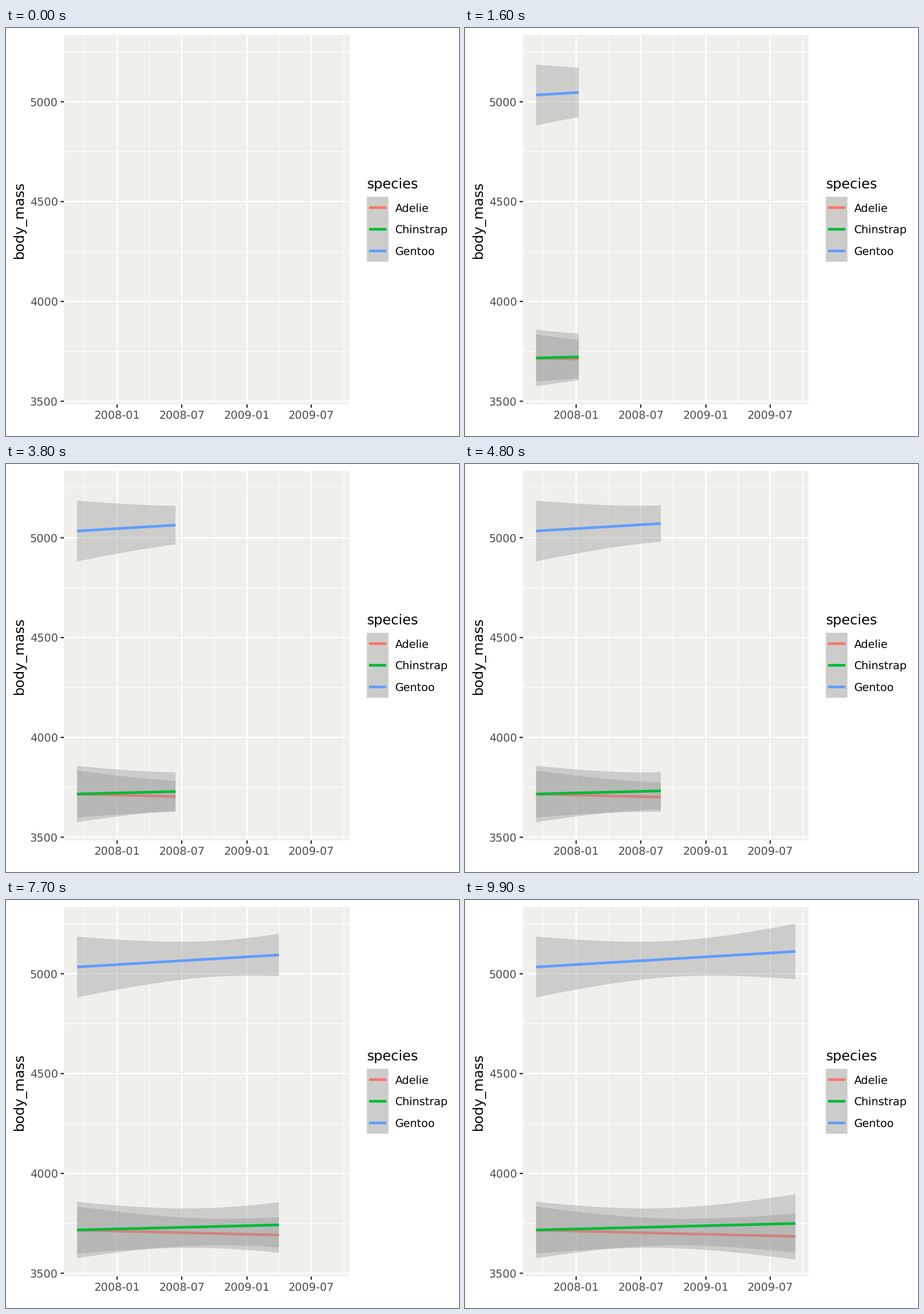
These frames come from a looping animation (789 px wide and 710 px high, 10 s). A matplotlib script:

```python
import numpy as np
import matplotlib.pyplot as plt
from matplotlib.animation import FuncAnimation
from matplotlib.patches import Polygon, Rectangle

W, H, DPI = 789, 710, 100
FRAMES, POINTS = 100, 80
PT = 2.182                      # pixels per layout point
PX = 72 / DPI                   # pixels to font points
LEFT, RIGHT, TOP, BOTTOM = 101.2, 598.2, 12, 654.9
X0, SPAN = 123.8, 451.7         # first date and width of the fits
PANEL, BAND = "#EFF0EB", "#999999"
SMALL, LARGE = 8.8 * PT, 11 * PT
THICK, THIN, BOLD = 2.33, 1.165, 4.66

# name, colour, line start and end, squared half width: a + b (u - c)^2
FITS = [
    ("Adelie", "#F8766D", 574.4, 585.5, 660, 0.0194, 229.4),
    ("Chinstrap", "#00BA38", 574.3, 562.9, 1053, 0.0284, 218.7),
    ("Gentoo", "#619CFF", 116.6, 89.6, 982, 0.0310, 242.0),
]

plt.rcParams.update({"font.family": "DejaVu Sans", "text.hinting": "none"})
fig = plt.figure(figsize=(W / DPI, H / DPI), dpi=DPI, facecolor="white")
ax = fig.add_axes([0, 0, 1, 1])
ax.set(xlim=(0, W), ylim=(H, 0))
ax.axis("off")


def rect(x, y, w, h, color, **kw):
    ax.add_patch(Rectangle((x, y), w, h, fc=color, lw=0, snap=False, **kw))


def line(xs, ys, color, width, z=1):
    return ax.plot(xs, ys, color=color, lw=width * PX, zorder=z, snap=False,
                   solid_capstyle="butt", solid_joinstyle="round")[0]


def text(x, y, s, size, color="black", ha="left", **kw):
    ax.text(x, y, s, fontsize=size * PX, color=color, ha=ha, va="baseline", **kw)


def day_x(day):
    """Pixel position of a day counted from 2008-01-01."""
    return 193.6 + 0.618 * day


def mass_y(mass):
    return 128.4 + (5000 - mass) * 0.3474


def draw_panel():
    rect(LEFT, TOP, RIGHT - LEFT, BOTTOM - TOP, PANEL, zorder=0)
    days = [-184, 0, 182, 366, 547, 731]
    for a, b in zip(days, days[1:]):
        line([day_x((a + b) / 2)] * 2, [TOP, BOTTOM], "white", THIN)
    for mass in range(3750, 5251, 500):
        line([LEFT, RIGHT], [mass_y(mass)] * 2, "white", THIN)

    labels = ["2008-01", "2008-07", "2009-01", "2009-07"]
    for day, label in zip(days[1:-1], labels):
        x = day_x(day)
        line([x, x], [TOP, BOTTOM], "white", THICK, 2)
        line([x, x], [BOTTOM, BOTTOM + 6], "#333333", THICK)
        text(x, 679.8, label, SMALL, "#4D4D4D", "center")
    for mass in range(3500, 5001, 500):
        y = mass_y(mass)
        line([LEFT, RIGHT], [y, y], "white", THICK, 2)
        line([LEFT - 6, LEFT], [y, y], "#333333", THICK)
        text(90.4, y + 7, mass, SMALL, "#4D4D4D", "right")
    text(29.6, (TOP + BOTTOM) / 2, "body_mass", LARGE, ha="center",
         rotation=90, rotation_mode="anchor")


def draw_legend():
    x, y, key = 628.4, 293.7, 37.7
    text(x, 278.6, "species", LARGE)
    rect(x, y, key, 3 * key, PANEL, zorder=0)
    rect(x, y, key, 3 * key, BAND, alpha=0.4, zorder=1)
    for i, (name, color, *_) in enumerate(FITS):
        mid = y + (i + 0.5) * key
        line([x + 0.1 * key, x + 0.9 * key], [mid, mid], color, BOLD, 2)
        text(x + key + 12, mid + 7, name, SMALL)


def curves(u, start, end, a, b, c):
    mid = start + (end - start) * u / SPAN
    half = np.sqrt(a + b * (u - c) ** 2)
    return mid, mid - half, mid + half


draw_panel()
draw_legend()

grid = np.linspace(0, SPAN, POINTS)
# each fitted point appears on a whole frame; frames between are interpolated
arrival = np.round(np.arange(POINTS) * (FRAMES - 1) / (POINTS - 1))

bands, lines = [], []
for i, fit in enumerate(FITS):
    band = Polygon([(0, 0)] * 3, fc=BAND, lw=0, alpha=0.4, zorder=3 + 2 * i)
    bands.append(ax.add_patch(band))
    lines.append(line([], [], fit[1], BOLD, 4 + 2 * i))


def update(k):
    end = np.interp(k, arrival, grid)
    u = np.append(grid[grid < end - 1e-6], end)
    x = X0 + u
    for fit, band, path in zip(FITS, bands, lines):
        mid, low, high = (np.interp(u, grid, v) for v in curves(grid, *fit[2:]))
        band.set_xy(np.column_stack([np.r_[x, x[::-1]], np.r_[low, high[::-1]]]))
        path.set_data(x, mid)
        band.set_visible(k > 0)
        path.set_visible(k > 0)
    return bands + lines


anim = FuncAnimation(fig, update, frames=FRAMES, interval=100,
                     repeat=True, repeat_delay=0, blit=False)
plt.show()
```
